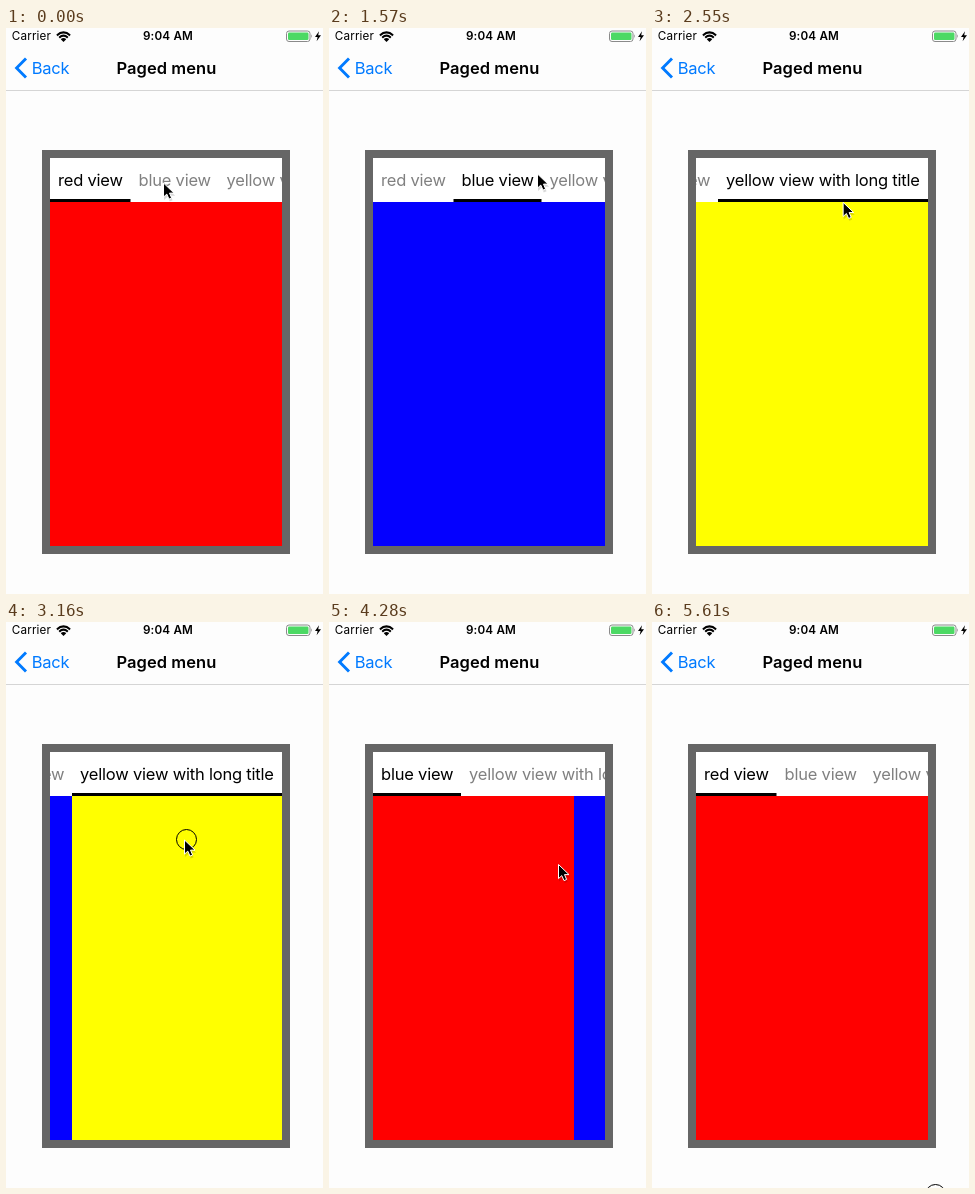
These frames come from a looping animation (317 px wide and 566 px high, 5.71 s). An HTML page:

```html
<!DOCTYPE html>
<html lang="en">
<head>
<meta charset="utf-8">
<title>Paged menu</title>
<style>
  html, body { margin: 0; width: 100%; height: 100%; overflow: hidden; background: #fdfdfd; }
  svg { display: block; width: 317px; height: 566px; }
  text { font-family: Inter, Roboto, sans-serif; font-size: 16.5px; white-space: pre; }
  .status { font-size: 11.7px; letter-spacing: .17px; }
  .clock { font-weight: 600; text-anchor: middle; }
  .title { font-weight: 600; letter-spacing: .05px; text-anchor: middle; }
  .back { fill: #007aff; letter-spacing: -.2px; }
  .tab { fill: #808080; letter-spacing: -.2px; }
  .tab.active { fill: #000; }
</style>
</head>
<body>
<svg viewBox="0 0 317 566">
  <defs>
    <clipPath id="window"><rect x="44" y="130" width="232" height="388"/></clipPath>
    <clipPath id="fan"><path d="M57.5 14L48 4.5V0H67V4.5Z"/></clipPath>
  </defs>
  <rect width="317" height="566" fill="#fdfdfd"/>

  <text class="status" x="5.7" y="12.3">Carrier</text>
  <g clip-path="url(#fan)" fill="none" stroke="#000" stroke-width="2.1">
    <circle cx="57.5" cy="13" r="8.6"/>
    <circle cx="57.5" cy="13" r="5.4"/>
    <circle cx="57.5" cy="13" r="1.5" stroke-width="3"/>
  </g>
  <text class="status clock" x="162" y="12.3">9:04 AM</text>
  <rect x="280.5" y="3" width="23.5" height="10.5" rx="2.5" fill="none" stroke="#8a8a8a"/>
  <rect x="282" y="4.5" width="20.5" height="7.5" rx="1.2" fill="#4cd964"/>
  <path d="M305.2 6.3q1.8 2 0 4z" fill="#8a8a8a"/>
  <path d="M313 3.2L309 9h2.6l-1 4.3 4.4-6.1h-2.8z"/>

  <path d="M20 30.5L10.6 40l9.4 9.5" fill="none" stroke="#007aff" stroke-width="2.9"/>
  <text class="back" x="25.7" y="46">Back</text>
  <text class="title" x="160.4" y="46">Paged menu</text>
  <rect y="62" width="317" height="1" fill="#d5d5d5"/>

  <rect x="36" y="122" width="248" height="404" fill="#666"/>
  <g clip-path="url(#window)">
    <rect x="44" y="130" width="232" height="44" fill="#fff"/>
    <g id="pages">
      <rect x="44" y="174" width="232" height="344" fill="#f00"/>
      <rect x="276" y="174" width="232" height="344" fill="#0400ff"/>
      <rect x="508" y="174" width="232" height="344" fill="#ff0"/>
    </g>
    <g id="menu">
      <text class="tab" x="52" y="158">red view</text>
      <text class="tab" x="132.5" y="158">blue view</text>
      <text class="tab" x="220.5" y="158">yellow view with long title</text>
      <rect id="underline" y="171" height="3"/>
    </g>
  </g>

  <g id="pointer">
    <circle id="press" cx="2.5" cy="0" r="10" fill="none" stroke="#000"/>
    <path d="M1 3V17.5l3.6-3.2 2.2 4.6 2.8-1.2-2.2-4.5h4.8z" opacity=".15"/>
    <path d="M.5 .5V14.6l3.3-3 2.2 5 2.6-1.1-2.1-4.9H11z" stroke="#fff"/>
  </g>
</svg>
<script>
// The picture refreshes in even steps; all times below are counted in steps.
const LOOP = 5710, STEPS = 65, PHASE = 25;
const WIDTH = 232;
const EDGES = [0, 80.5, 168.5, 378.5];
const GLIDE = 3.4, SETTLE = 3.9;

const GESTURES = [
  { press: 11, release: 13, page: 1, tap: true },
  { press: 24, release: 25, page: 2, tap: true },
  { press: 35, release: 37, page: 1 },
  { press: 45, release: 48.16, page: 0 },
  { press: 64, release: 65, page: 0, tap: true }
];

// Pointer tip: [step, x, y]
const PATH = [
  [13, 157, 154.5], [18, 208, 145.5], [20, 245, 147], [22, 220, 149.5], [26, 215, 151],
  [34, 150, 212], [36, 178, 217.5], [41, 166, 222], [44, 95, 242.5], [46, 95, 242.5],
  [49, 229, 242], [52, 281, 572.5]
];

const $ = id => document.getElementById(id);
const tabs = [...document.querySelectorAll('.tab')];
const linear = u => u;
const smooth = u => (1 - Math.cos(Math.PI * u)) / 2;
const settle = u => 1 - (1 - u) ** 3;
const mix = (a, b, u) => a + (b - a) * u;
const clamp = (v, low, high) => Math.min(Math.max(v, low), high);
const shift = (id, x, y = 0) => $(id).setAttribute('transform', `translate(${x} ${y})`);

// Each move: [start, duration, end value, easing]
const moves = { page: [], scroll: [], underline: [], active: [] };
let scroll = 0;
for (const { release, page, tap } of GESTURES) {
  const start = tap ? release - .32 : release - 1;
  const menuStart = tap ? start : start + SETTLE + .17;
  const lag = tap ? -.06 : .13;
  if (tap) moves.page.push([start, GLIDE, page, smooth]);
  else moves.page.push([start - 1, 1, page + .905, linear], [start, SETTLE, page, settle]);

  // The menu scrolls just far enough to show the whole tab.
  scroll = clamp(scroll, EDGES[page + 1] - WIDTH, EDGES[page]);
  moves.scroll.push([menuStart, GLIDE, scroll, smooth]);
  moves.underline.push([menuStart + lag, GLIDE, page, smooth]);
  moves.active.push([menuStart, 0, page, () => 1]);
}

function track(list, step) {
  let value = 0;
  for (const [start, duration, end, ease] of list) {
    if (step < start) break;
    value = mix(value, end, ease(Math.min(1, (step - start) / duration)));
  }
  return value;
}

function edgeAt(position, side) {
  const i = Math.min(1, Math.floor(position));
  return mix(EDGES[i + side], EDGES[i + 1 + side], position - i);
}

function pointerAt(step) {
  let [, x, y] = PATH[0];
  for (let i = 1; i < PATH.length; i++) {
    const [from] = PATH[i - 1], [to, endX, endY] = PATH[i];
    const u = clamp((step - from) / (to - from), 0, 1);
    x = mix(x, endX, u);
    y = mix(y, endY, u);
  }
  return [x, y];
}

function draw(step) {
  shift('pages', -Math.round(track(moves.page, step) * WIDTH));
  shift('menu', -track(moves.scroll, step));

  const position = track(moves.underline, step);
  const left = edgeAt(position, 0);
  $('underline').setAttribute('x', 44 + left);
  $('underline').setAttribute('width', edgeAt(position, 1) - left);

  const active = track(moves.active, step);
  tabs.forEach((tab, i) => tab.classList.toggle('active', i === active));

  const pressed = GESTURES.some(g => step >= g.press && step < g.release);
  $('press').setAttribute('visibility', pressed ? 'visible' : 'hidden');
  shift('pointer', ...pointerAt(step));
}

const origin = performance.now();
function frame() {
  const t = (performance.now() - origin) % LOOP;
  draw(Math.min(STEPS - 1, Math.floor((t + PHASE) * STEPS / LOOP)));
  requestAnimationFrame(frame);
}
frame();
</script>
</body>
</html>
```
